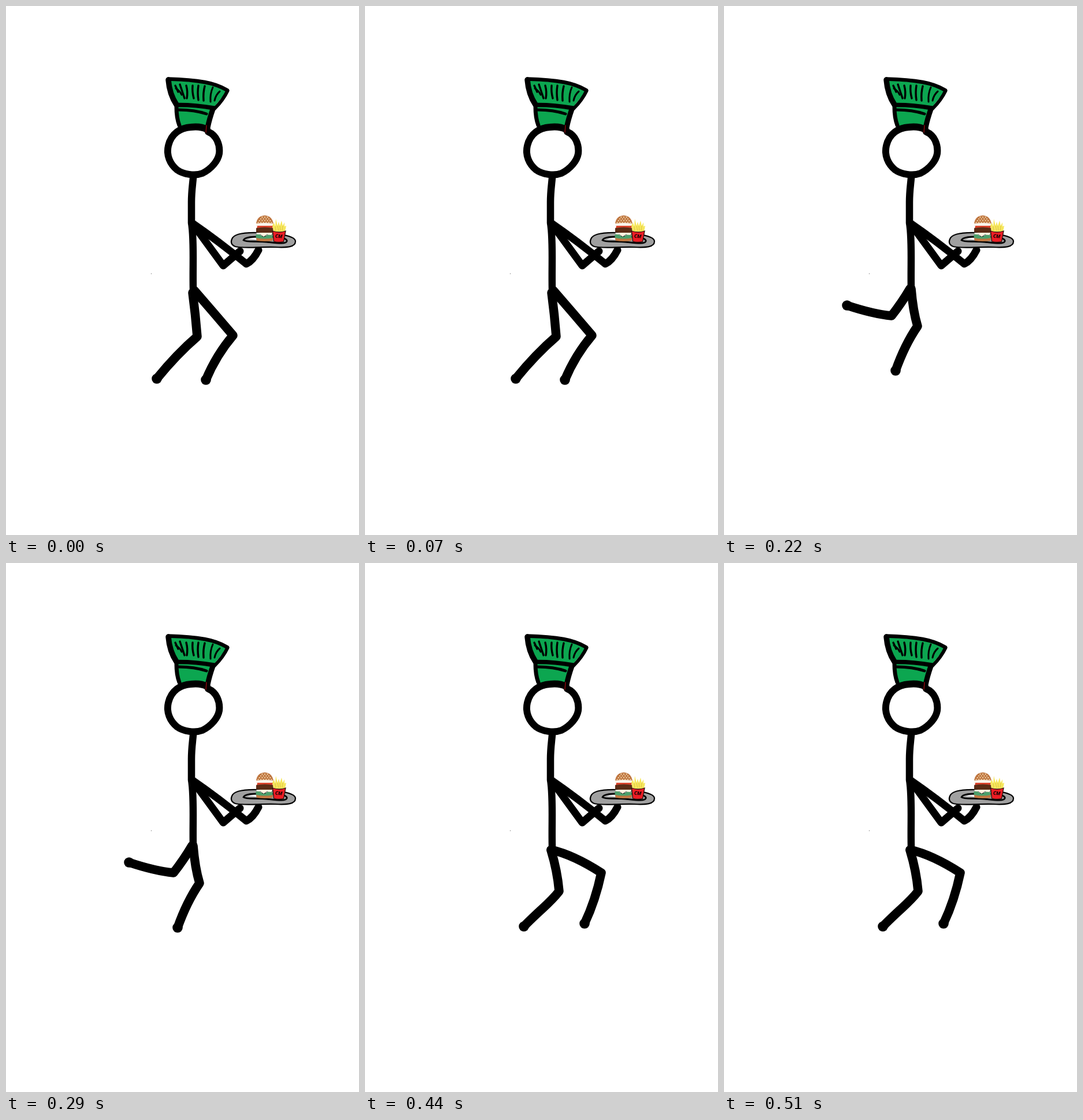
These frames come from a looping animation (611 by 917 pixels, 550 ms). An HTML page:

```html
<!DOCTYPE html>
<html lang="en">
<head>
<meta charset="utf-8">
<title>Running waiter</title>
<style>
  html, body { margin: 0; width: 100%; height: 100%; overflow: hidden; background: #fff; }
  svg { display: block; width: 100vw; height: 100vh; }
  .ink { fill: none; stroke: #000; stroke-linecap: round; stroke-linejoin: round; }
</style>
</head>
<body>
<svg viewBox="0 0 611 917">
  <circle cx="251.5" cy="464" r=".7" fill="#777"/>

  <g id="hat" class="ink">
    <path fill="#0ca650" stroke="none" d="M283 129 L345 133 L383 147 L358 178 L350 212 L324 208 L299 209 L295 174 Z"/>
    <path stroke-width="9.5" d="M281 128 Q283 153 295 171"/>
    <path stroke-width="6.5" d="M281 126.500 C300 127 322 128 344 132 Q366 136 383 146"/>
    <path stroke-width="6" d="M383.500 147 Q376 163 361 178"/>
    <path stroke-width="7.5" d="M295 171.500 Q326 171 360 177"/>
    <path stroke-width="7" d="M295 175 Q295 194 300 207"/>
    <path stroke-width="9" d="M358 179 Q352 196 349 211"/>
    <path stroke-width="5" d="M299 180 C315 180 332 182 347 187"/>
    <path stroke-width="3.4" d="M293 138 L298 149 M301 136 Q305 148 309 160 M312 138 Q315 149 313 160
      M323 138 Q322 149 325 160 M333 138 Q331 150 333 163 M344 139 Q341 150 342 164"/>
    <path stroke-width="3" d="M294 143 Q301 147 304 154 M358 141 Q353 152 354 166 M370 148 Q363 154 361 164"/>
  </g>

  <g id="figure" class="ink">
    <path stroke-width="12" d="M350 218 C364 224 371 240 369 256 C367 268 356 282 340 290
      C327 295 307 292 296 284 C284 274 277 259 281 242 C286 221 302 211 320 210 Q337 208 348 214"/>
    <path stroke="#a00c10" stroke-width="1.3" d="M347 207 L346 219"/>
    <path stroke-width="12.500" d="M324 298 C323 310 321 322 321 340 V376 C326 405 323 450 324 492"/>
    <path stroke-width="13" d="M322 376 L376 450 L405 425"/>
    <path stroke-width="13" d="M322 376 Q367 407 416 447 Q428 441 437 423"/>
  </g>

  <g id="legs" class="ink" stroke-width="15.500"></g>

  <g id="tray" stroke="#000" stroke-width="2.200">
    <path fill="#a0a0a0" d="M391 404 C394 395 410 392 438 393 C470 394 501 398 501 408
      C501 418 487 419 466 418 C440 417 413 421 397 417 Q387 413 391 404 Z"/>
    <path fill="#a0a0a0" stroke-width="2.800" d="M411 406 C414 399 431 400 450 400 C470 399 488 402 486 408
      C484 413 470 411 451 409 C435 407 416 410 411 406 Z"/>
    <path fill="#fff" stroke="none" d="M418 405 Q425 401.500 433 402 L433 405.500 Q426 404 418 405 Z"/>
  </g>

  <g id="burger">
    <path fill="#bf7640" d="M433 378 Q434 364 448 363 Q461 364 463 378 Z"/>
    <g id="seeds" fill="#f6dfb6"></g>
    <path fill="#faf4eb" d="M433 377 Q448 375 463 377 L462 382 Q448 384 433 381 Z"/>
    <path fill="#d9422b" d="M435 381 H462 L461 386 H434 Z"/>
    <path fill="#5b2c16" d="M433 385 Q448 382 463 385 L462 393 Q448 395 433 392 Z"/>
    <path fill="#fff4df" d="M433 393 H462 L457 399 L452 395 L446 400 L440 395 L436 398 Z"/>
    <path fill="#4da06b" d="M432 397 Q437 394 442 398 Q447 403 452 397 Q458 396 462 398 L461 404 Q448 406 433 402 Z"/>
    <path fill="#bf7640" d="M433 402 Q447 405 462 402 L461 407 Q448 409 434 407 Z"/>
  </g>

  <g id="fries">
    <path fill="#f6e75c" d="M463 391 L461 380 L464 376 L466 382 L467 369 L470 381 L472 374 L474 381
      L477 372 L479 381 L482 375 L482 382 L485 381 L483 391 Z"/>
    <path fill="none" stroke="#d5b53c" stroke-width=".7" d="M466 382 L467 390 M470 381 L472 390 M474 381 L475 390 M479 381 L478 390"/>
    <path fill="#ed1c24" stroke="#28100c" stroke-width="1.3" d="M461.500 390 Q473 394 484 390 L480.500 408.500 Q471 410.500 463.500 408 Z"/>
    <text x="472" y="402" text-anchor="middle" transform="rotate(4 472 402)"
      font-family="Open Sans, sans-serif" font-size="8.5" font-weight="700" font-style="italic">CM</text>
  </g>
</svg>
<script>
const NS = 'http://www.w3.org/2000/svg';
const STEP = 110;
const poses = [
  ['M323 497 Q328 535 331 573 Q296 603 261 646', 'M326 493 Q359 531 393 571 Q364 605 346 648'],
  ['M323 490 Q323 520 321 546 C301 556 296 572 277 579 Q258 585 246 595', 'M326 492 Q340 525 347 561 L351 611'],
  ['M322 490 Q308 514 290 537 Q258 534 213 519', 'M324 490 Q327 528 335 555 Q313 587 297 632'],
  ['M322 493 Q312 530 299 555 Q283 564 259 567 L233 574', 'M322 492 Q348 513 375 540 Q361 576 347 613'],
  ['M322 498 Q333 534 336 569 C319 591 305 599 275 630', 'M322 497 Q361 506 409 537 Q399 585 380 625']
];

function add(parent, tag, attrs) {
  const el = document.createElementNS(NS, tag);
  for (const key in attrs) el.setAttribute(key, attrs[key]);
  return parent.appendChild(el);
}

const legs = document.getElementById('legs');
const loop = STEP * poses.length;
poses.forEach((pair, i) => {
  const pose = add(legs, 'g', {});
  for (const d of pair) {
    const leg = add(pose, 'path', { d });
    const foot = leg.getPointAtLength(leg.getTotalLength());
    add(pose, 'circle', { cx: foot.x, cy: foot.y, r: 8.8, fill: '#000', stroke: 'none' });
  }
  pose.animate([
    { opacity: 1, offset: 0, easing: 'step-end' },
    { opacity: 0, offset: 1 / poses.length },
    { opacity: 0, offset: 1 }
  ], { duration: loop, delay: i * STEP - loop, iterations: Infinity });
});

const seeds = document.getElementById('seeds');
for (let row = 0; row < 4; row++) {
  const count = 3 + row;
  for (let i = 0; i < count; i++) {
    add(seeds, 'ellipse', {
      cx: 448 + (i - (count - 1) / 2) * 4.6, cy: 366 + row * 3.1, rx: 1.3, ry: .9
    });
  }
}
</script>
</body>
</html>
```
